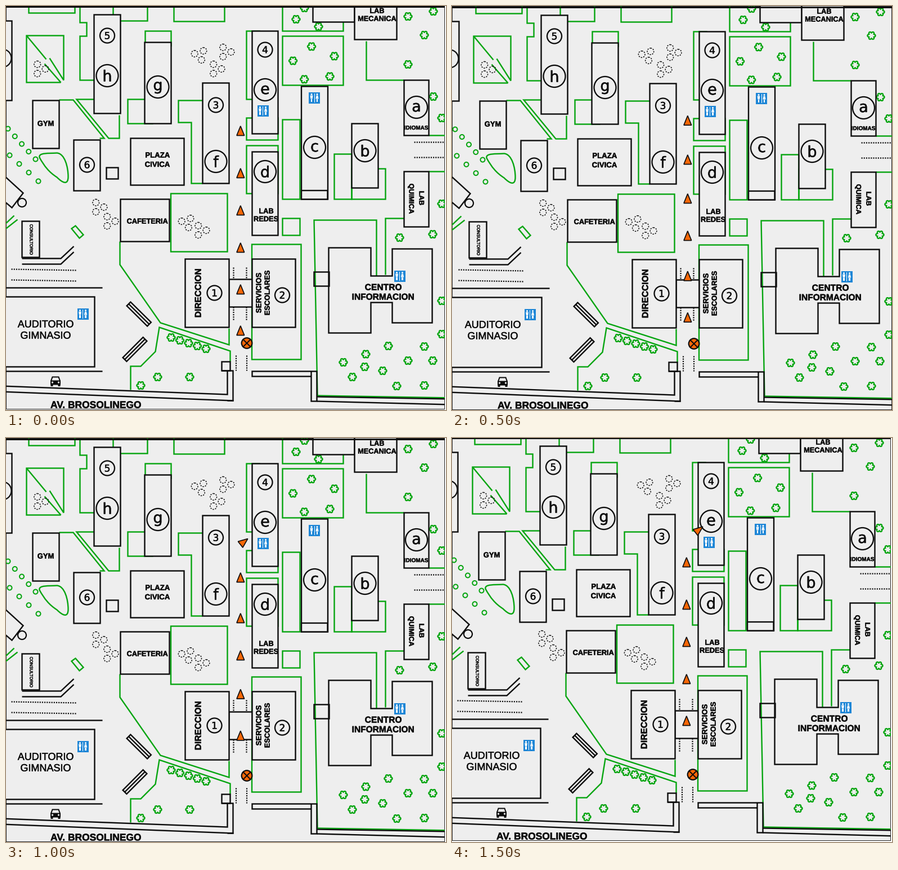
These frames come from a looping animation (782 px wide and 716 px high, 2 s). A matplotlib script:

```python
import numpy as np
import matplotlib.pyplot as plt
from matplotlib.animation import FuncAnimation
from matplotlib.patches import Circle, PathPatch, Polygon, Rectangle
from matplotlib.path import Path
from matplotlib.patheffects import withStroke

W, H, DPI = 782, 716, 64
PT = 72 / DPI  # points per pixel
PAPER, INK, GREEN = "#eeeeee", "#0c0c0c", "#06a510"
ORANGE, BLUE = "#f96706", "#1e86d6"
OUT = -9  # safely past the page edge
FAR = 790

fig = plt.figure(figsize=(W / DPI, H / DPI), dpi=DPI, facecolor="white")
ax = fig.add_axes([0, 0, 1, 1])
ax.axis("off")
ax.add_patch(Rectangle((0, 0), 1, 1, transform=ax.transAxes, fc=PAPER,
                       ec="#222222", lw=2 * PT, zorder=0))


# ---- drawing helpers ----

def line(*pts, color=INK, lw=2.4, ls="-"):
    x, y = zip(*pts)
    ax.plot(x, y, color=color, lw=lw * PT, ls=ls, zorder=2, snap=False,
            solid_joinstyle="miter", solid_capstyle="butt", dash_capstyle="butt")


def shape(*pts, color=INK, lw=2.4, fill=PAPER):
    ax.add_patch(Polygon(pts, fc=fill, ec=color, lw=lw * PT, zorder=2,
                         joinstyle="miter", snap=False))


def box(x0, y0, x1, y1, **kw):
    shape((x0, y0), (x1, y0), (x1, y1), (x0, y1), **kw)


def green(*pts):
    line(*pts, color=GREEN)


def lawn(x0, y0, x1, y1):
    box(x0, y0, x1, y1, color=GREEN, fill="none")


def dots(*pts):
    line(*pts, lw=2.2, ls=(0, (1, 0.9)))


def ring(x, y, r, color=INK, lw=2.2, ls="-", fc="none", z=2):
    ax.add_patch(Circle((x, y), r, fc=fc, ec=color, lw=lw * PT, ls=ls, zorder=z))


def row(draw, start, end, n):
    for x, y in np.linspace(start, end, n):
        draw(x, y)


def label(x, y, s, size, angle=0, weight="bold", font="Liberation Sans"):
    ax.text(x, y, s, fontsize=size * PT, family=font, weight=weight, color=INK,
            rotation=angle, rotation_mode="anchor", ha="center", va="baseline",
            clip_on=True, zorder=3,
            path_effects=[withStroke(linewidth=0.5 * PT, foreground=INK)])


def badge(x, y, s):
    big = s.isalpha()
    ring(x, y, 19.5 if big else 13, lw=2.3)
    if not big or s == "g":
        drop = 6
    else:
        drop = 10 if s in "bdfh" else 7.5
    label(x, y + drop, s, 27 if big else 17, weight="normal", font="DejaVu Sans")


def tower(x, y, length, width=47, **marks):
    """Tall building; marks map a badge to its distance from the top."""
    box(x, y, x + width, y + length)
    for s, d in marks.items():
        badge(x + width / 2, y + d, s.strip("n"))


# ---- small symbols ----

def tree(x, y):
    t = np.linspace(0, 2 * np.pi, 73)
    r = 4.9 + 2.2 * np.abs(np.cos(3 * t))
    green(*zip(x + r * np.cos(t), y + r * np.sin(t)))


def shrub(x, y):
    ring(x, y, 4, GREEN, 2)


def clump(x, y, turn=0):
    for a in np.radians(turn + np.arange(0, 360, 120)):
        ring(x + 9.5 * np.cos(a), y + 9.5 * np.sin(a), 5.8, lw=1.5, ls=(0, (1.6, 1.3)))


def restroom(x, y):
    kw = dict(ec="none", zorder=3)
    ax.add_patch(Rectangle((x - 10, y - 10), 20, 20, fc=BLUE, **kw))
    ax.add_patch(Rectangle((x - 0.5, y - 8), 1, 16, fc="white", **kw))
    for cx, top, low in ((x - 5, 2.4, 1.6), (x + 5, 1.3, 2.6)):
        ax.add_patch(Circle((cx, y - 6), 1.5, fc="white", **kw))
        ax.add_patch(Polygon([(cx - top, y - 4), (cx + top, y - 4),
                              (cx + low, y + 2), (cx - low, y + 2)], fc="white", **kw))
        ax.add_patch(Rectangle((cx - 1.2, y + 2), 2.4, 5.5, fc="white", **kw))


def bench(x0, y0, x1, y1, half=4.8):
    a, b = np.array([x0, y0]), np.array([x1, y1])
    n = np.array([y0 - y1, x1 - x0]) / np.hypot(*(b - a)) * half
    shape(a - n, b - n, b + n, a + n)
    line(a, b)


def car(x, y):
    line((x - 8, y - 1), (x - 5.5, y - 8), (x + 5.5, y - 8), (x + 8, y - 1), lw=2)
    box(x - 8, y - 1, x + 8, y + 5, lw=2, fill=INK)
    for side in (-1, 1):
        box(x + side * 6.5 - 1, y + 6, x + side * 6.5 + 1, y + 7.5, lw=2, fill=INK)
        ring(x + side * 5.5, y + 1.6, 1.2, PAPER, 0.8, fc=PAPER)


# ---- the map ----

def draw_lawns():
    """Closed beds; buildings drawn later hide the sides they touch."""
    for x0, x1, y1 in [(40, 122, 12), (190, 251, 26), (298, 388, 27), (491, 599, 44)]:
        lawn(x0, OUT, x1, y1)
    lawn(247, 44, 293, 70)
    lawn(216, 165, 260, 208)
    lawn(427, 44, 450, 165)
    lawn(427, 198, 483, 237)
    lawn(427, 247, 483, 332)
    lawn(491, 53, 599, 140)
    lawn(491, 201, 522, 342)
    lawn(491, 376, 522, 406)
    lawn(583, 262, 614, 342)
    lawn(614, 288, 674, 342)
    lawn(292.5, 332, 393, 435)
    lawn(436.5, 422, 524, 626)


def draw_borders():
    green((131, 0), (131, 29), (143, 29), (143, 53), (131, 53), (131, 131), (156, 131))
    green((349, 167), (306, 167), (306, 206), (329, 206), (329, 314), (349, 314))
    green((97, 135), (36, 135), (36, 52), (102, 52), (102, 131), (77, 92))
    green((36, 52), (71, 94))
    green((68, 102), (97, 135))
    green((94, 166), (119, 166), (174, 234), (166, 234))
    green((156, 165), (125, 165), (182, 234), (201, 234), (201, 193))
    green((640, 62), (640, 131), (707, 131))
    for y in (229, 293):
        green((751, y), (FAR, y))
    green((707, 376), (674, 376), (674, 476))
    green((FAR, 694), (553, 690), (547, 379), (658, 379), (658, 478))
    green((202, 417), (202, 458), (274, 561), (396, 600), (396, 571))
    green((221, 680), (221, 638), (239, 638), (265, 612), (272, 569), (398, 611), (398, 630))
    shape((116, 394), (123, 389), (137, 405), (130, 411), color=GREEN)
    green((-3, 387), (14, 371))
    green((-3, 396), (20, 378))
    pond = Path([(59, 268), (57, 259), (75, 261), (90, 260), (104, 261), (110, 285),
                 (110, 302), (110, 317), (101, 314), (90, 303), (76, 294), (68, 284),
                 (59, 268)], [Path.MOVETO] + [Path.CURVE4] * 12)
    ax.add_patch(PathPatch(pond, fc="none", ec=GREEN, lw=2.4 * PT, zorder=2))


def draw_plants():
    row(shrub, (3, 217), (52, 271), 5)
    row(shrub, (6, 264), (57, 310), 4)

    row(tree, (293, 587), (355, 607), 5)
    row(tree, (239, 672), (269, 657), 2)
    row(tree, (530, 3), (515, 23), 2)
    row(tree, (714, 18), (743, 51), 2)
    row(tree, (759, 160), (774, 198), 2)
    row(tree, (699, 410), (758, 404), 2)
    row(tree, (774, 522), (774, 581), 2)
    row(tree, (679, 602), (599, 631), 3)
    row(tree, (637, 639), (669, 646), 2)
    row(tree, (714, 628), (758, 628), 2)
    row(tree, (694, 673), (743, 672), 2)
    for spot in [(326, 657), (555, 36), (759, 9), (714, 103), (774, 350), (615, 657),
                 (743, 603)]:
        tree(*spot)
    for a in np.radians(190 + 72 * np.arange(5)):
        tree(548 + 39 * np.cos(a), 102 + 31 * np.sin(a))

    for x, y in [(344, 86), (321, 383)]:
        clump(x, y, 72)
    for x, y in [(390, 81), (373, 111), (164, 356), (184, 381), (346, 397), (60, 111)]:
        clump(x, y)


def draw_buildings():
    tower(156, 15, 175, n5=37, h=108)
    tower(246, 64, 144, g=79)
    tower(349, 136, 178, n3=39, f=139)
    tower(437, 44, 182, 46, n4=33, e=104)
    tower(437, 258, 148, 46, d=35)
    tower(524.5, 142, 200, c=108)
    tower(614, 208, 114, b=48)
    tower(120, 237, 90, n6=44)
    tower(707, 131, 98, 44, a=48)
    tower(707, 293, 98, 44)
    box(524.5, 326.5, 571, 342)
    box(545, OUT, 619, 28)
    box(619, OUT, 694, 59)
    box(47, 167, 94, 252)
    box(178, 286, 199, 306)
    box(221, 234, 316, 317)
    box(203, 342, 290, 417)
    box(28, 381, 59, 445)
    box(396, 484, 437, 533)
    box(318, 448, 396, 569)
    box(437, 448, 514, 569)
    box(OUT, 515, 157, 639)
    badge(370, 508, "1")
    badge(490.5, 512, "2")
    shape((573, 428), (648, 428), (648, 478), (686, 478), (686, 430), (757, 430),
          (757, 561), (686, 561), (686, 525), (648, 525), (648, 579), (573, 579))
    box(547, 471, 574, 496, fill="none")
    box(383, 630, 398, 646)
    box(OUT, 26, 10, 167)
    ring(-7, 92, 16)
    shape((-3, 301), (30, 331), (10, 357), (-3, 346))
    ring(28, 348, 7.5)


def draw_roads():
    line((OUT, 1), (FAR, 1), lw=3)
    for y in (499, 647):
        line((OUT, y), (171, y))
    for y in (447, 457):
        line((28, y), (97, y), (120, y - 21.5))
    for y in (466, 485):
        dots((9, y), (125, y + 2))
    for y in (241, 268):
        dots((725, y), (FAR, y))
    for x in (404, 427):
        dots((x, 463), (x, 484))
        dots((x, 533), (x, 557))
    for x in (408.5, 427.5):
        dots((x, 619), (x, 646))
    line((OUT, 673), (393, 688), (393, 646))
    line((OUT, 683), (403, 699), (403, 646), (383, 646))
    line((393, 699), (404, 699))
    line((542, 656), (437, 656), (437, 647), (552, 647), (552, 700), (542, 700), (542, 647))
    line((552, 692), (FAR, 696))
    line((552, 700), (FAR, 706))
    bench(217.5, 527.5, 254, 563.5)
    bench(210.5, 626, 246.5, 590)
    car(87.5, 665)


def draw_labels():
    label(70, 212, "GYM", 13)
    label(269, 268, "PLAZA", 13.2)
    label(268.5, 284.5, "CIVICA", 13.2)
    label(250.5, 385, "CAFETERIA", 12.8)
    label(462, 367, "LAB", 12.8)
    label(461.5, 381, "REDES", 12.8)
    label(659, 12, "LAB", 12.7)
    label(659, 26, "MECANICA", 12.7)
    label(728.5, 218.5, "IDIOMAS", 10)
    label(42, 413.5, "CONSULTORIO", 7.5, 270, "normal")
    label(734, 340, "LAB", 12.4, 270)
    label(716, 341, "QUIMICA", 12.4, 270)
    label(346, 508.5, "DIRECCION", 15.5, 90)
    label(453, 508, "SERVICIOS", 13.2, 90)
    label(468, 508, "ESCOLARES", 12.8, 90)
    label(670, 503, "CENTRO", 15.6)
    label(669.5, 520, "INFORMACION", 15.5)
    label(70, 569, "AUDITORIO", 18, weight="normal")
    label(70, 589, "GIMNASIO", 18, weight="normal")
    label(159, 712, "AV. BROSOLINEGO", 17.4)
    for x, y in [(456, 185), (547.5, 162), (136, 545), (699, 478)]:
        restroom(x, y)


def draw_here():
    ring(427.5, 597, 9.3, fc=ORANGE, z=4)
    for s in (-6, 6):
        ax.plot([421.5, 433.5], [597 - s, 597 + s], color=INK, lw=2 * PT, zorder=5)


for draw in (draw_lawns, draw_borders, draw_plants, draw_buildings, draw_roads,
             draw_labels, draw_here):
    draw()


# ---- motion ----

SHAKE = [(0, 0), (2, 1), (0, 1), (0, -1)]  # the page jolts at each step
STOPS = [575, 502, 428, 362, 296, 221, 163]  # heights along the walk, one loop apart
TIP = np.array([(0, -8.7), (6.8, 8), (-6.8, 8)])

arrows = [ax.add_patch(Polygon(TIP, fc=ORANGE, ec=INK, lw=1.7 * PT, zorder=6))
          for _ in STOPS[1:]]


def arrow_at(u):
    """Arrow outline after u stops: straight up, then a turn to the right."""
    y = np.interp(u, range(len(STOPS)), STOPS)
    x = 416.3 + 48 * max(0, u - 5.54)
    a = np.radians(52 if u > 5.5 else 0)
    spin = np.array([[np.cos(a), np.sin(a)], [-np.sin(a), np.cos(a)]])
    return TIP @ spin + (x, y)


def update(i):
    dx, dy = SHAKE[i]
    w, h = 780 + dx, 715 + dy
    ax.set_position([0, 1 - h / H, w / W, h / H])
    # whole numbers fall on pixel centres
    ax.set_xlim(-dx - 0.5, w - dx - 0.5)
    ax.set_ylim(h - dy - 0.5, -dy - 0.5)
    for k, arrow in enumerate(arrows):
        arrow.set_xy(arrow_at(k + i / 3))
    return arrows


anim = FuncAnimation(fig, update, frames=4, interval=500, repeat=True,
                     repeat_delay=0, blit=False)
plt.show()
```
